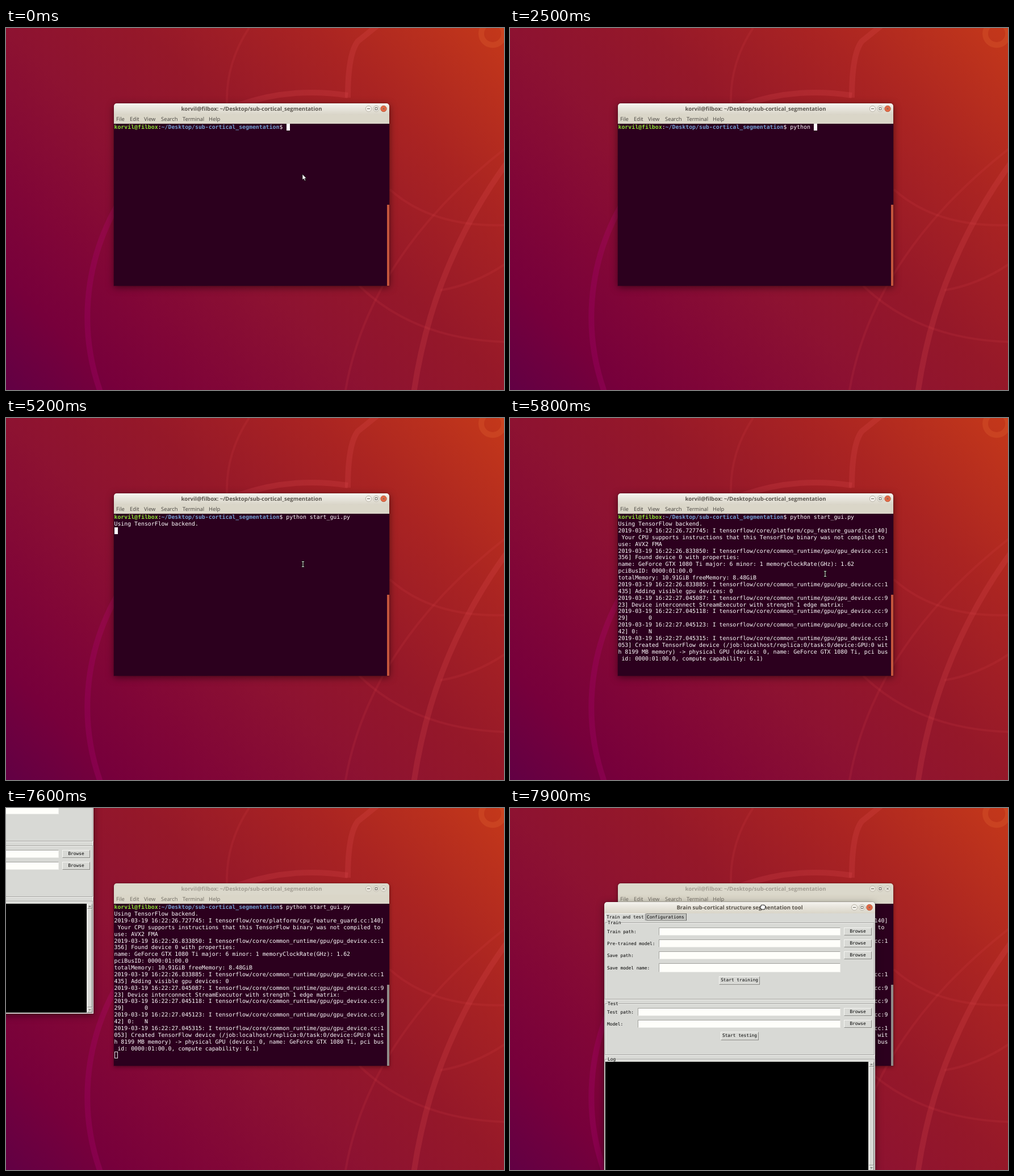
These frames come from a looping animation (877x639 px, 8000 ms). An HTML page:

```html
<!DOCTYPE html>
<html lang="en">
<head>
<meta charset="utf-8">
<title>Terminal session</title>
<style>
html, body { margin: 0; width: 100%; height: 100%; overflow: hidden; background: #8c1230; }
body { position: relative; text-rendering: geometricPrecision; cursor: default; }
#wall, #mouse { position: absolute; left: 0; top: 0; }
.win { position: absolute; border-radius: 5px 5px 0 0; box-shadow: 0 0 0 1px rgba(0,0,0,.15), 0 3px 13px rgba(0,0,0,.5); }
.idle { box-shadow: 0 0 0 1px rgba(0,0,0,.12), 0 2px 7px rgba(0,0,0,.4); }
.bar {
  height: 20px; border-radius: 5px 5px 0 0; text-align: center;
  font: bold 9.6px/19px "Open Sans", sans-serif; color: #5a554d;
  background: linear-gradient(#f5f3ef, #e9e6de 40%, #d9d5c8);
}
.idle .bar { background: #dbd8cb; color: #a39e93; }
.bar svg { position: absolute; right: 1px; top: 0; }
.bar circle { fill: #f1efe9; stroke: #b9b4a7; }
.bar path { fill: none; stroke: #6a665e; }
.bar .close { fill: #e76a46; stroke: #b85a3c; }
.idle .bar circle { fill: #e6e3d9; stroke: #c2bdb0; }
.menu { position: absolute; left: 0; top: 20px; width: 100%; height: 16px; background: #dad6c8; }
.menu span { position: absolute; top: 1px; font: 9.4px/14px "Open Sans", sans-serif; color: #46433e; }
.idle .menu span { color: #6d6960; }
#shell { position: absolute; left: 0; top: 36px; width: 100%; height: 286px; background: #2c001e; overflow: hidden; }
#shell pre {
  margin: 0; position: absolute; left: .5px; top: 1.2px; color: #fff;
  font: 9.87px/11.88px "DejaVu Sans Mono", monospace;
}
#shell b { color: #8ae234; }
#shell b + b { color: #729fcf; }
#thumb { position: absolute; right: 0; bottom: 0; width: 4px; height: 143px; background: #c4563c; }
.idle #thumb { background: #8f8b89; }
#caret { position: absolute; width: 6px; height: 12px; box-sizing: border-box; background: #fff; }
.idle #caret { background: none; border: 1px solid #e8e4e6; }
#tool { transform-origin: 0 0; }
.form { position: absolute; left: 0; top: 20px; width: 100%; height: 456px; background: #d8d9d5; }
.form div, .form svg { position: absolute; box-sizing: border-box; }
.form { font: 7.8px/12px "DejaVu Sans Mono", monospace; color: #000; }
.label { white-space: pre; background: #d8d9d5; height: 9px; line-height: 9px; }
.entry { background: #fefefa; border: 1px solid; border-color: #a2a29e #eeeeea #eeeeea #a2a29e; }
.button { text-align: center; border: 1px solid; border-color: #f6f6f3 #8c8c88 #8c8c88 #f6f6f3; }
.group { border: 1px solid #a3a39f; box-shadow: inset 1px 1px #f4f4f1, 1px 1px #f4f4f1; }
.tab { border: 1px solid; border-color: #f6f6f3 #77777a #d8d9d5 #f6f6f3; padding-left: 1px; white-space: pre; }
.back { background: #c3c4c0; border-color: #8b8b88 #5f5f5d #8b8b88 #8b8b88; padding-left: 0; }
.log { background: #000; }
</style>
</head>
<body>
<svg id="wall" width="877" height="639" fill="none">
  <defs>
    <linearGradient id="sky" gradientUnits="userSpaceOnUse" x1="0" y1="639" x2="758" y2="-119">
      <stop offset="0" stop-color="#620044"/><stop offset=".13" stop-color="#77003b"/>
      <stop offset=".25" stop-color="#810637"/><stop offset=".42" stop-color="#8d1231"/>
      <stop offset=".58" stop-color="#951829"/><stop offset=".78" stop-color="#aa2422"/>
      <stop offset="1" stop-color="#c4381a"/>
    </linearGradient>
    <linearGradient id="line" gradientUnits="userSpaceOnUse" x1="150" y1="0" x2="460" y2="0">
      <stop offset="0" stop-color="#aa006e" stop-opacity=".32"/>
      <stop offset="1" stop-color="#e14b50" stop-opacity=".22"/>
    </linearGradient>
  </defs>
  <rect width="877" height="639" fill="url(#sky)"/>
  <g stroke="url(#line)" stroke-width="10">
    <path d="M602 119A396 396 0 0 0 165 639L170 652"/>
    <path d="M655 -5L620 23Q602 45 602 123"/>
    <path d="M882 238Q750 420 718 645"/>
  </g>
  <g stroke="#e14b50" stroke-opacity=".13" stroke-width="4">
    <path d="M428 0Q387 62 389 134"/>
    <path d="M598 639Q640 400 880 212"/>
    <path d="M676 285Q750 352 880 348"/>
    <path d="M765 463Q825 453 880 416"/>
    <path d="M622 455Q720 550 880 554"/>
  </g>
  <circle cx="857" cy="10" r="20" stroke="#f0823c" stroke-opacity=".18" stroke-width="10"/>
</svg>

<div class="win" id="term" style="left:190px;top:133px;width:485px;height:322px">
  <div class="bar">korvil@filbox: ~/Desktop/sub-cortical_segmentation</div>
  <div class="menu"></div>
  <div id="shell"><pre><b>korvil@filbox</b>:<b>~/Desktop/sub-cortical_segmentation</b>$ <span id="out"></span></pre>
    <div id="caret"></div><div id="thumb"></div></div>
</div>

<div class="win" id="tool" style="left:0;top:0;width:477px;height:476px">
  <div class="bar">Brain sub-cortical structure segmentation tool</div>
  <div class="form"></div>
</div>

<svg id="mouse" width="877" height="639" stroke-linejoin="round">
  <path id="arrow" d="M0 0V10L2.3 8L4 11.5L5.6 10.8L4 7.4H7Z" fill="#fff" stroke="#111" stroke-width=".7"/>
  <g id="beam" fill="none">
    <path d="M-2.5 -4.5H2.5M0 -4.5V4.5M-2.5 4.5H2.5" stroke="#111" stroke-width="2.4"/>
    <path d="M-2 -4.5H2M0 -4.5V4.5M-2 4.5H2" stroke="#d5e0d2"/>
  </g>
  <path id="hand" d="M-5 0Q-4.500 -1.500 -3 -1V-3Q-1.800 -4.600 -.6 -3.500Q.8 -4.800 2 -3.400Q4 -4 4.600 -2V1L3.500 4H-2.500Q-3 2 -5 0Z" fill="#fff" stroke="#111"/>
</svg>

<script>
const $ = id => document.getElementById(id);
const CELL = 5.942, ROW = 11.88, PROMPT = 51, LOOP = 8000;

// window chrome
const buttons = `<svg width="44" height="20"><circle cx="8.5" cy="9.500" r="5.200"/><circle cx="22" cy="9.500" r="5.200"/>
  <circle class="close" cx="35" cy="9.500" r="5.200"/>
  <path d="M6 9.500h5M20 7.500h4v4h-4zM33.200 7.700l3.600 3.600m0-3.600l-3.600 3.600"/></svg>`;
document.querySelectorAll('.bar').forEach(bar => bar.insertAdjacentHTML('beforeend', buttons));

const menu = { File: 4, Edit: 28, View: 53, Search: 83, Terminal: 121, Help: 167 };
document.querySelector('.menu').innerHTML =
  Object.entries(menu).map(([name, x]) => `<span style="left:${x}px">${name}</span>`).join('');

// tool form, measured from the window's top left corner
const form = document.querySelector('.form');
function box(kind, x, y, w, h, text = '') {
  const el = document.createElement('div');
  el.className = kind;
  el.style.cssText = `left:${x}px;top:${y - 20}px;` + (w ? `width:${w}px;height:${h}px` : '');
  el.textContent = text;
  form.append(el);
}
const label = (x, y, text) => box('label', x, y - 4.5, 0, 0, text);
function field(text, x, y, h = 14, browse = true) {
  label(5, y + h / 2, text);
  box('entry', x, y, 416 - x, h);
  if (browse) box('button', 422, y, 49, 14, 'Browse');
}
box('tab', 2, 20, 71, 13, 'Train and test');
box('tab back', 74, 20, 71, 13, 'Configurations');
box('group', 1, 36, 475, 136);
box('group', 1, 179, 475, 91);
box('group', 1, 277, 475, 198);
label(6, 36.5, 'Train');
label(6, 179.5, 'Test');
label(6, 277.5, 'Log');
field('Train path:', 96, 45);
field('Pre-trained model:', 96, 66);
field('Save path:', 96, 87);
field('Save model name:', 96, 108, 16, false);
box('button', 202, 131, 72, 15, 'Start training');
field('Test path:', 59, 187);
field('Model:', 59, 208);
box('button', 205, 229, 67, 15, 'Start testing');
box('log', 2, 282, 463, 192);
box('button', 466, 282, 9, 9);
box('button', 466, 291, 9, 174);
box('button', 466, 465, 9, 9);
form.insertAdjacentHTML('beforeend', `<svg style="left:466px;top:262px" width="9" height="192" fill="#8e8e8a">
  <path d="M2 6h5L4.500 3zM2 186h5L4.500 189z"/></svg>`);

// program output, wrapped at 80 columns
const stamp = (time, file, text) => `2019-03-19 16:22:${time}: I tensorflow/core/${file}] ${text}`;
const gpu = (time, line, text) => stamp(time, 'common_runtime/gpu/gpu_device.cc:' + line, text);
const lines = [
  'Using TensorFlow backend.',
  stamp('26.727745', 'platform/cpu_feature_guard.cc:140',
    'Your CPU supports instructions that this TensorFlow binary was not compiled to use: AVX2 FMA'),
  gpu('26.833850', 1356, 'Found device 0 with properties:'),
  'name: GeForce GTX 1080 Ti major: 6 minor: 1 memoryClockRate(GHz): 1.62',
  'pciBusID: 0000:01:00.0',
  'totalMemory: 10.91GiB freeMemory: 8.48GiB',
  gpu('26.833885', 1435, 'Adding visible gpu devices: 0'),
  gpu('27.045087', 923, 'Device interconnect StreamExecutor with strength 1 edge matrix:'),
  gpu('27.045118', 929, '     0'),
  gpu('27.045123', 942, '0:   N'),
  gpu('27.045315', 1053, 'Created TensorFlow device (/job:localhost/replica:0/task:0/device:GPU:0 with 8199 MB memory)' +
    ' -> physical GPU (device: 0, name: GeForce GTX 1080 Ti, pci bus id: 0000:01:00.0, compute capability: 6.1)')
].flatMap(text => text.match(/.{1,80}/g));

// each step changes part of the state; win is x, y, scale, opacity
const steps = [
  [0, { cmd: '', row: 0, caret: 1, idle: 0, win: null, mouse: ['arrow', 522, 258] }],
  [400, { caret: 0, mouse: ['beam', 523, 258] }],
  [600, { cmd: 'p', caret: 1, mouse: null }],
  [800, { cmd: 'py' }],
  [900, { cmd: 'pyth' }],
  [1200, { cmd: 'pytho' }],
  [1300, { cmd: 'python ' }],
  [1900, { caret: 0 }],
  [2500, { caret: 1 }],
  [2800, { cmd: 'python s' }],
  [3000, { cmd: 'python star' }],
  [3400, { cmd: 'python start_' }],
  [3500, { cmd: 'python start_gui.py ' }],
  [4200, { row: 1 }],
  [4500, { row: 2 }],
  [5000, { caret: 0 }],
  [5100, { mouse: ['beam', 523, 258] }],
  [5200, { caret: 1 }],
  [5400, { row: 5 }],
  [5500, { row: 12 }],
  [5600, { row: 22, mouse: ['beam', 530, 268] }],
  [5800, { caret: 0, mouse: ['beam', 555, 275] }],
  [5900, { caret: 1, mouse: ['beam', 545, 268] }],
  [6100, { idle: 1, win: [-323, -70, .86, .5], mouse: ['beam', 515, 250] }],
  [6200, { win: [-323, -98, .95, .95], mouse: ['beam', 482, 233] }],
  [6300, { win: [-323, -113, 1, 1] }],
  [6500, { mouse: ['beam', 196, 192] }],
  [6600, { mouse: null }],
  [7700, { win: [60, 118, 1, 1], mouse: ['hand', 174, 26] }],
  [7800, { win: [125, 148, 1, 1], mouse: ['hand', 392, 148] }],
  [7900, { win: [166, 166, 1, 1], mouse: ['hand', 445, 175] }]
];

function draw({ cmd, row, caret, idle, win, mouse }) {
  $('out').textContent = [cmd, ...lines.slice(0, Math.max(0, row - 1))].join('\n');
  const col = row ? 0 : PROMPT + cmd.length;
  $('caret').style.cssText =
    `left:${.5 + col * CELL}px;top:${Math.round(row * ROW)}px;visibility:${caret ? 'visible' : 'hidden'}`;
  $('term').classList.toggle('idle', !!idle);
  const tool = $('tool').style;
  tool.display = win ? 'block' : 'none';
  if (win) {
    const [x, y, scale, opacity] = win;
    tool.transform = `translate(${x}px,${y}px)` + (scale < 1 ? ` scale(${scale})` : '');
    tool.opacity = opacity;
  }
  for (const id of ['arrow', 'beam', 'hand']) {
    const on = mouse && mouse[0] === id;
    $(id).style.display = on ? 'inline' : 'none';
    if (on) $(id).setAttribute('transform', `translate(${mouse[1]} ${mouse[2]})`);
  }
}

const start = performance.now();
let shown = 0;
function tick() {
  const t = (performance.now() - start) % LOOP;
  const count = steps.filter(([at]) => at <= t).length;
  if (count !== shown) {
    shown = count;
    draw(Object.assign({}, ...steps.slice(0, count).map(step => step[1])));
  }
  requestAnimationFrame(tick);
}
tick();
</script>
</body>
</html>
```
